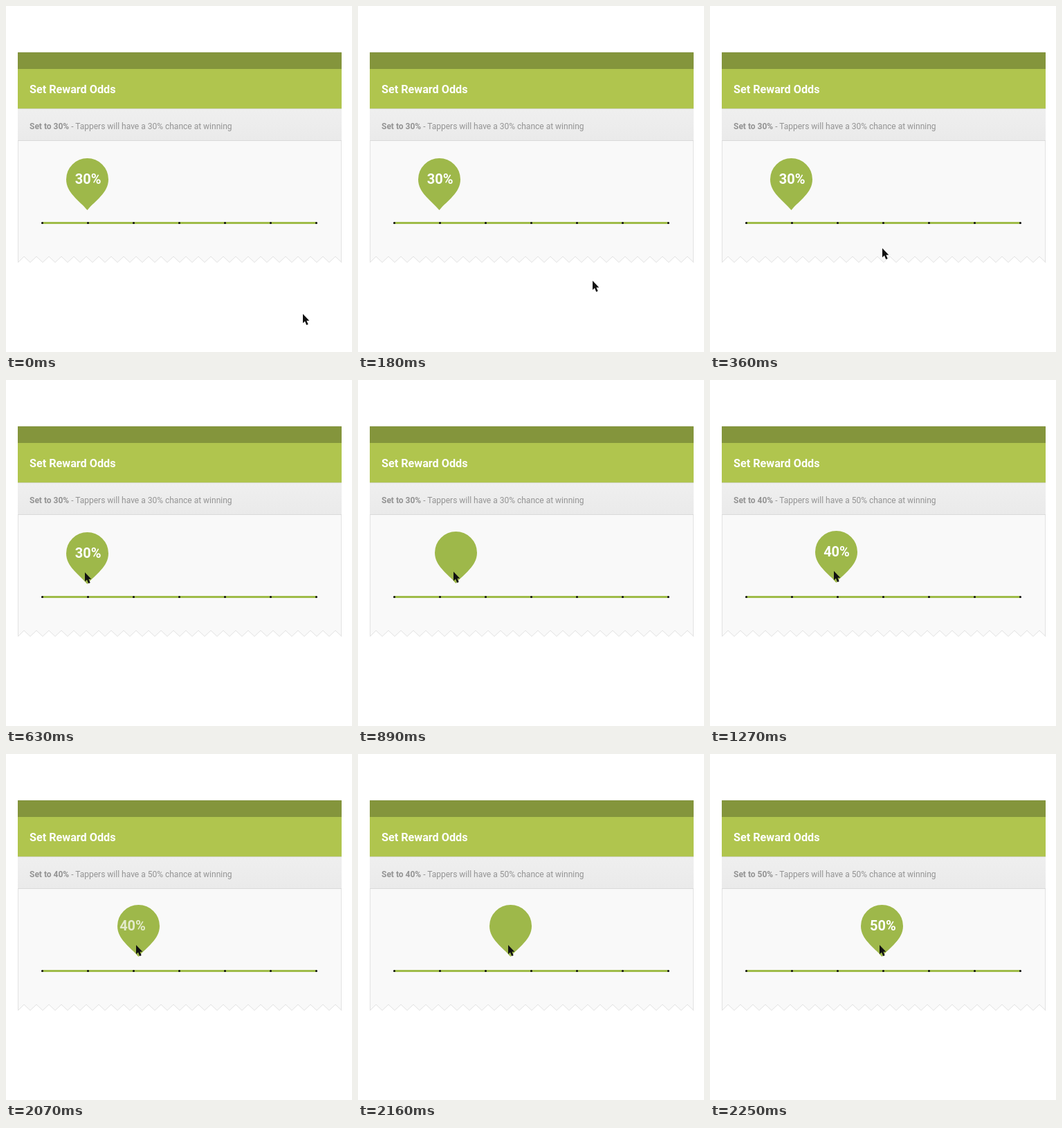
An HTML page for the animation above (4.68 s loop, 500 by 500 pixels).

```html
<!DOCTYPE html>
<html lang="en">
<head>
<meta charset="utf-8">
<title>Reward odds slider</title>
<style>
  html, body { margin: 0; width: 100%; height: 100%; overflow: hidden; background: #fff; }
  svg { display: block; width: 100%; height: 100%; font-family: Roboto, sans-serif; }
  .bold { font-weight: 700; }
</style>
</head>
<body>
<svg viewBox="0 0 500 500">
  <defs>
    <linearGradient id="shade" x2="0" y2="1">
      <stop stop-color="#efefef"/>
      <stop offset="1" stop-color="#eaeaea"/>
    </linearGradient>
  </defs>
  <path id="card" fill="#f9f9f9" stroke="#e2e2e2"/>
  <rect x="17" y="148" width="468" height="47" fill="url(#shade)"/>
  <path d="M17 194.5H485" stroke="#dadada"/>
  <rect x="17" y="67" width="468" height="24" fill="#84953c"/>
  <rect x="17" y="91" width="468" height="57" fill="#b0c54e"/>
  <path d="M17 148.5H485" stroke="#d0d4c0"/>
  <text class="bold" x="34" y="126" font-size="16.2" fill="#fff">Set Reward Odds</text>
  <text x="34" y="178" font-size="12" fill="#939393"><tspan class="bold">Set to <tspan id="setting"></tspan></tspan> - Tappers will have a <tspan id="chance"></tspan> chance at winning</text>
  <path d="M52 313.5H449" stroke="#9fbc49" stroke-width="3"/>
  <path d="M52.5 313.5H449" stroke="#111" stroke-width="3.2" stroke-linecap="round" stroke-dasharray="0 66"/>
  <path id="pin" fill="#9eb84a" d="M117.5 295C106 281 87 270 87 250.5a30.5 30.5 0 0 1 61 0C148 270 129 281 117.5 295Z"/>
  <text id="label" class="bold" font-size="20" fill="#fff" text-anchor="middle"></text>
  <path id="cursor" fill="#111" d="M0 0V13.2L3 10.5L5.2 16L7.7 15L5.4 9.7H9.3Z"/>
</svg>
<script>
const LOOP = 4680, STEP = 30;
const $ = id => document.getElementById(id);
const clamp = (v, max = 1) => Math.max(0, Math.min(max, v));
// Number of 30 ms steps begun since `start`, limited to `count`
const steps = (t, start, count) => clamp(Math.floor((t - start) / STEP) + 1, count);
const move = (el, x, y) => el.setAttribute('transform', `translate(${Math.round(x)} ${Math.round(y)})`);

let edge = 'M17.5 67V370.5';
for (let x = 17; x < 485; x += 18) edge += `L${x + 9} 362L${x + 18} 370.5`;
$('card').setAttribute('d', edge + 'L484.5 370V67Z');

function draw(t) {
  const approach = steps(t, STEP, 21) / 21;
  const first = steps(t, 800, 11), second = steps(t, 2070, 7);
  const dx = 65 * first / 11 + 66 * second / 7;
  const dy = -2 * first / 11;
  move($('pin'), dx, dy);
  move($('cursor'), 429 - 315 * approach + dx, 445 - 167 * approach + dy);

  const stage = second >= 5 ? 2 : first >= 8 ? 1 : 0;
  const value = ['30%', '40%', '50%'][stage];
  $('setting').textContent = value;
  $('chance').textContent = stage ? '50%' : '30%';

  const label = $('label');
  label.textContent = value;
  label.setAttribute('x', [118.7, 183, 249.8][stage]);
  label.setAttribute('y', stage ? 255 : 257);
  const opacity = [
    1 - first / 4,
    t >= 1270 ? 1 - second / 3.5 : (first - 8) / 4,
    (second - 5) / 2
  ][stage];
  label.setAttribute('opacity', clamp(opacity));
}

function tick() {
  draw(performance.now() % LOOP);
  requestAnimationFrame(tick);
}
tick();
</script>
</body>
</html>
```
